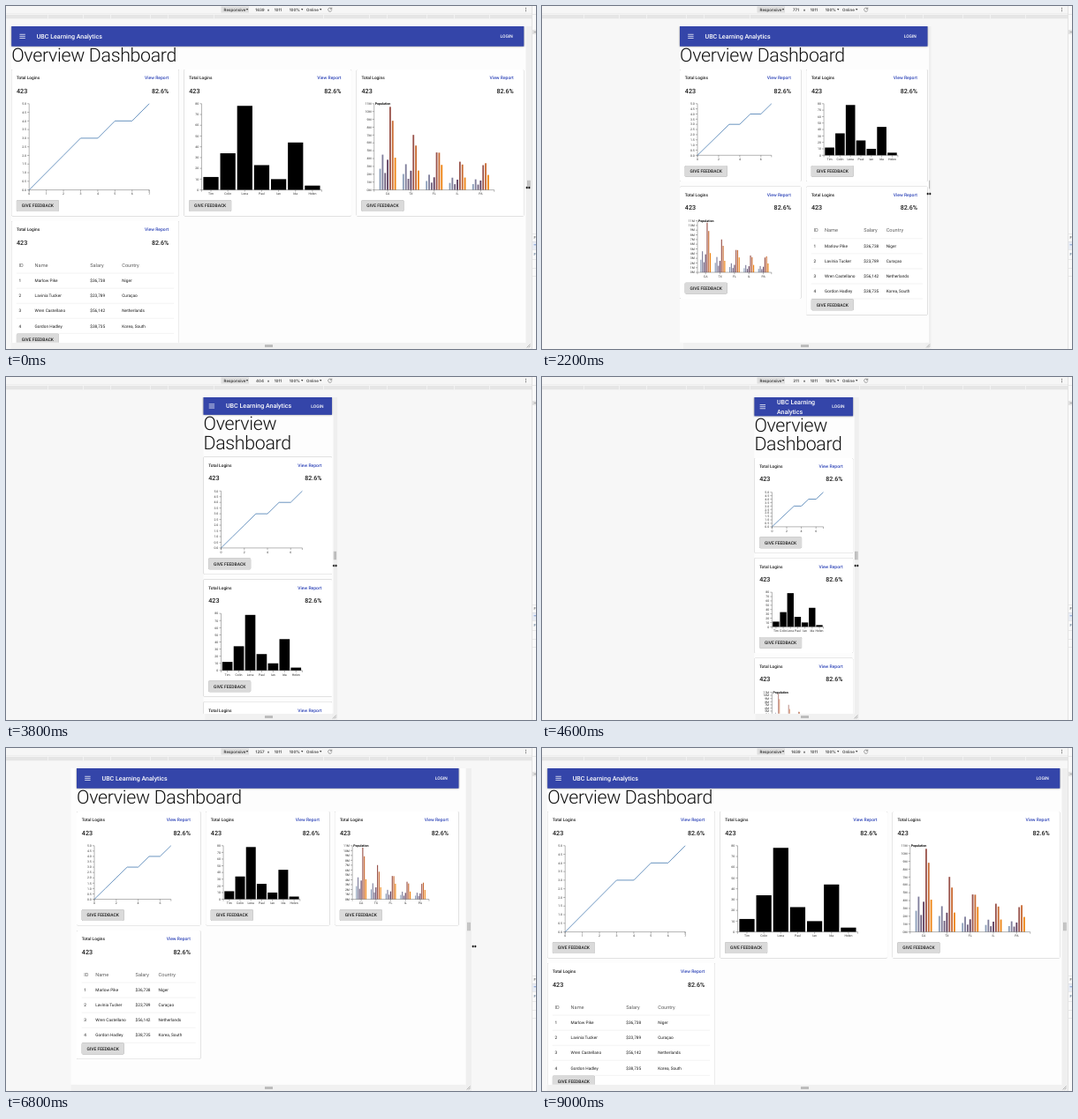
An HTML page for the animation above (9100 ms loop, 600 by 389 pixels).

```html
<!DOCTYPE html>
<html lang="en">
<head>
<meta charset="utf-8">
<title>Overview Dashboard</title>
<style>
html, body { margin: 0; width: 100%; height: 100%; overflow: hidden; background: #f7f7f7; }
svg { display: block; width: 600px; height: 389px; }
text { font-family: Roboto, "Liberation Sans", sans-serif; text-rendering: geometricPrecision; white-space: pre; }
.ui { font-family: Inter, Roboto, sans-serif; }
.card { filter: drop-shadow(.1px .8px .5px rgba(0,0,0,.45)); }
.bar { filter: drop-shadow(0 .9px .8px rgba(0,0,0,.45)); }
</style>
</head>
<body>
<svg id="stage" viewBox="0 0 600 389"></svg>
<script>
const K = 0.3556;            // device pixels to stage pixels
const LOOP = 9100, STEP = 100;
const PAD = 16 * K;
const INK = '#1c1c1c', BLUE = '#3445a9';

// time, frame left edge, content left edge, pointer x, pointer y
const MOVES = [
  [0, 5.6, 6.2, 591, 206],
  [1000, 61.4, 56.2, 528, 212],
  [2000, 143, 139, 454, 213],
  [2200, 160, 156, 438, 213],
  [3000, 189, 186, 403, 214],
  [3100, 198, 197.2, 398, 214],
  [4000, 233, 231, 365, 214],
  [4600, 241.7, 240.4, 356, 214],
  [5000, 238, 239, 364, 216],
  [6000, 168, 173, 450, 221],
  [6800, 73.5, 80, 530, 225],
  [7000, 66, 71, 540, 225],
  [8000, 13, 18, 590, 224],
  [8700, 5.6, 6.2, 606, 222],
  [LOOP, 5.6, 6.2, 606, 222]
];
const LINE = [0, 1, 2, 3, 3, 4, 4, 5];
const BARS = [['Tim', 12], ['Colin', 34], ['Lena', 78], ['Paul', 23], ['Ian', 10], ['Ida', 44], ['Helen', 4]];
const STATES = {
  CA: [2.7, 4.5, 2.16, 3.85, 10.6, 8.82, 4.11],
  TX: [2.03, 3.28, 1.42, 2.45, 7.02, 5.66, 2.47],
  FL: [1.14, 1.94, 0.93, 1.61, 4.78, 4.75, 3.19],
  IL: [0.89, 1.56, 0.73, 1.31, 3.6, 3.24, 1.58],
  PA: [0.74, 1.35, 0.68, 1.2, 3.16, 3.41, 1.91]
};
const TINTS = ['#8c9fba', '#7f7e9b', '#70607e', '#5f3f5f', '#9a544c', '#c96a32', '#ee8412'];
const ROWS = [
  ['ID', 'Name', 'Salary', 'Country'],
  ['1', 'Marlow Pike', '$36,738', 'Niger'],
  ['2', 'Lavinia Tucker', '$23,789', 'Curaçao'],
  ['3', 'Wren Castellano', '$56,142', 'Netherlands'],
  ['4', 'Gordon Hadley', '$38,735', 'Korea, South']
];

const n = v => +v.toFixed(2);
const range = (count, f) => Array.from({ length: count }, (_, i) => f(i)).join('');
const rect = (x, y, w, h, fill, more = '') =>
  `<rect x="${n(x)}" y="${n(y)}" width="${n(w)}" height="${n(h)}" fill="${fill}" ${more}/>`;
const path = (d, stroke, width, more = '') =>
  `<path d="${d}" fill="none" stroke="${stroke}" stroke-width="${width}" ${more}/>`;
// y is the vertical middle of the capitals
const text = (s, x, y, size, { fill = INK, weight = 400, anchor = 'start', cls = '', more = '' } = {}) =>
  `<text x="${n(x)}" y="${n(y + size * 0.355)}" font-size="${size}" font-weight="${weight}" fill="${fill}" text-anchor="${anchor}" class="${cls}" ${more}>${s}</text>`;

function pose(t) {
  let i = 1;
  while (MOVES[i][0] < t) i++;
  const a = MOVES[i - 1], b = MOVES[i];
  const u = (t - a[0]) / (b[0] - a[0]);
  return a.slice(1).map((v, k) => v + (b[k + 1] - v) * u);
}

function yAxis(x, y, h, labels) {
  const gap = h / (labels.length - 1);
  let d = `M${n(x)} ${n(y)}v${n(h)}`, out = '';
  labels.forEach((s, i) => {
    const ty = y + h - i * gap;
    d += `M${n(x - 2.1)} ${n(ty)}h2.1`;
    out += text(s, x - 3.2, ty, 3.5, { anchor: 'end', fill: '#333' });
  });
  return path(d, '#444', .4) + out;
}

function xAxis(x, y, w, marks) {
  let d = `M${n(x)} ${n(y + 2.1)}v-2.1h${n(w)}v2.1`, out = '';
  for (const [s, mx] of marks) {
    d += `M${n(mx)} ${n(y)}v2.1`;
    out += text(s, mx, y + 4.6, 3.5, { anchor: 'middle', fill: '#333' });
  }
  return path(d, '#444', .4) + out;
}

function lineChart(x, y, w, h) {
  const px = i => x + w * i / 7;
  const marks = LINE.map((_, i) => [i, px(i)]).filter(m => w > 120 || m[0] % 2 === 0);
  const d = 'M' + LINE.map((v, i) => `${n(px(i))} ${n(y + h - h * v / 5)}`).join('L');
  return yAxis(x, y, h, Array.from({ length: 11 }, (_, i) => (i / 2).toFixed(1))) +
    xAxis(x, y + h, w, marks) + path(d, '#4479b0', .8);
}

function barChart(x, y, w, h) {
  const step = w / 7.1, bw = step * .9;
  const left = i => x + step * (i + .1);
  return BARS.map(([, v], i) => rect(left(i), y + h - h * v / 80, bw, h * v / 80, '#000')).join('') +
    yAxis(x, y, h, Array.from({ length: 9 }, (_, i) => i * 10)) +
    xAxis(x, y + h, w, BARS.map(([s], i) => [s, left(i) + bw / 2]));
}

function groupChart(x, y, w, h) {
  const step = Math.floor(w / K / 5.1) * K;
  const thin = Math.floor(step * .9 / K / 7.4) * K, bw = thin * .64;
  const mid = i => x + w / 2 + (i - 2) * step;
  const bars = Object.values(STATES).map((set, i) => set.map((v, j) =>
    rect(mid(i) + (j - 3) * thin - bw / 2, y + h - h * v / 11, bw, h * v / 11, TINTS[j])).join('')).join('');
  return bars + yAxis(x, y, h, Array.from({ length: 12 }, (_, i) => i + 'M')) +
    xAxis(x, y + h, w, Object.keys(STATES).map((s, i) => [s, mid(i)])) +
    text('Population', x + 1, y + .2, 3.6, { weight: 700, fill: '#000' });
}

function table(x, y, w) {
  const extra = w - 138;
  const cols = [8.3, 21 + extra * .105, 65.5 + extra * .456, 91 + extra * .66];
  return ROWS.map((row, r) => {
    const cy = y + (r ? 50.5 + r * 17.07 : 49.5);
    return row.map((s, c) => text(s, x + cols[c], cy, r ? 4.75 : 5.6, { fill: r ? INK : '#5f5f5f' })).join('') +
      path(`M${n(x + PAD)} ${n(y + 59 + r * 17.07)}h${n(w - 2 * PAD)}`, '#e0e0e0', .4);
  }).join('');
}

const button = (x, y) =>
  rect(x, y, 48, 12.8, '#dadada', 'rx="1.4" class="card"') +
  text('GIVE FEEDBACK', x + 24, y + 6.5, 4.95, { weight: 500, anchor: 'middle' });

function card(x, y, w, h, body) {
  const right = x + w - 11.5, end = { weight: 500, anchor: 'end' };
  return rect(x, y, w, h, '#fff', 'rx="1.4" class="card"') +
    text('Total Logins', x + 5.8, y + 9.6, 4.8, { weight: 500 }) +
    text('View Report', right, y + 9.6, 5, { ...end, fill: '#3046b8' }) +
    text('423', x + 5.8, y + 24, 7.2, { weight: 500 }) +
    text('82.6%', right, y + 24, 7.1, end) +
    body + button(x + PAD, y + h - 18.2);
}

function content(x, w) {
  const wide = w / K >= 600, split = w < 130;
  const head = (wide ? 64 : split ? 60 : 56) * K;
  const edge = wide ? 0 : 3, cy = 23 + head / 2;
  const white = { fill: '#fff', weight: 500 };
  const title = (s, dy) => text(s, x + 28.5 - edge, cy + dy, 7.1, white);
  let out = rect(x, 23, w, head, BLUE, 'class="bar"') +
    path([-2.1, 0, 2.1].map(d => `M${n(x + 9.2 - edge)} ${n(cy + d)}h6.4`).join(''), '#fff', .75) +
    (split ? title('UBC Learning', -5.35) + title('Analytics', 5.35) : title('UBC Learning Analytics', 0)) +
    text('LOGIN', x + w - 12.6 + edge, cy, 4.95, { ...white, anchor: 'end' });

  const lines = w < 188 ? ['Overview', 'Dashboard'] : ['Overview Dashboard'];
  const size = 60 * K;
  lines.forEach((s, i) => {
    out += text(s, x, 23 + head + 9.7 + i * size, size, { weight: 300, fill: '#111', more: 'letter-spacing="-.3"' });
  });

  const cols = w / K >= 960 ? 3 : wide ? 2 : 1;
  const cw = (w - PAD * (cols - 1)) / cols;
  const chartW = cw - 53.6, chartH = chartW * .753 - 4.6;
  let y = 23 + head + size * lines.length + 4.9;
  [lineChart, barChart, groupChart, null].forEach((draw, i) => {
    const col = i % cols;
    if (i && !col) y += chartH + 68.6 + PAD;
    const cx = x + col * (cw + PAD);
    out += draw
      ? card(cx, y, cw, chartH + 68.6, draw(cx + 20, y + 38.8, chartW, chartH))
      : card(cx, y, cw, 145.8, table(cx, y, cw));
  });
  return out;
}

function toolbar(width) {
  const ui = (s, x, anchor = 'start') => text(s, x, 4, 4.5, { cls: 'ui', anchor, weight: 500, fill: '#2a2a2a' });
  const drop = x => `<path d="M${x} 3h2.4l-1.2 2z" fill="#444"/>`;
  const cuts = [47, 87, 118, 163, 183, 235];
  return rect(0, 0, 600, 8.3, '#f6f6f6') + rect(0, 8.3, 600, .4, '#dcdcdc') +
    rect(243.5, .5, 31.5, 7, '#dedede') + ui('Responsive', 246.6) + drop(271.8) +
    ui(width, 287.5, 'middle') + ui('×', 297, 'middle') + ui('1011', 308, 'middle') +
    ui('100%', 320.7) + drop(334) + ui('Online', 340) + drop(355) +
    path('M368.6 3.2A2.1 2.1 0 1 0 368.8 4.6M368.8 1.6v1.8h-1.8', '#666', .6) +
    [2.2, 4, 5.8].map(y => `<circle cx="588.5" cy="${y}" r=".55" fill="#555"/>`).join('') +
    rect(0, 9.8, 595, 4.6, '#e5e5e5') +
    cuts.map(c => rect(c, 9.8, .7, 4.6, '#f8f8f8') + rect(594 - c, 9.8, .7, 4.6, '#f8f8f8')).join('');
}

const sidePanel = () =>
  rect(595.5, 0, 4.5, 389, '#fafafa') + rect(595.3, 0, .5, 389, '#cfcfcf') +
  rect(596, 27, 4, 5, '#e2e2e2') + rect(597.6, 29, 2.4, .6, '#888') +
  rect(596, 267, 4, 9, '#e9edf5') +
  [9, 258, 267, 276, 287, 297, 306].map(y => rect(596, y, 4, .4, '#d0d0d0')).join('') +
  text('F', 597.4, 262.5, 4.2, { fill: '#444' }) + text('F', 597.4, 281.3, 4.2, { fill: '#357' }) +
  rect(597.6, 270.5, 2.4, .7, '#4a78c8');

function pointer(x, y, touch) {
  if (touch) return `<circle cx="${n(x)}" cy="${n(y)}" r="3.3" fill="#777" fill-opacity=".85" stroke="#555" stroke-width=".5"/>`;
  return `<path transform="translate(${n(x)} ${n(y)})" d="M-2.7 0l1.8-1.7v1.1h1.8v-1.1l1.8 1.7l-1.8 1.7v-1.1h-1.8v1.1z" fill="#111" stroke="#fff" stroke-width=".35" paint-order="stroke"/>`;
}

function scene(t) {
  const [left, x, px, py] = pose(t);
  const right = 594 - left, w = 592.5 - 2 * x;
  const grips = range(3, i => rect(right + 2 + i * 1.2, 198, .6, 9, '#a8a8a8'));
  return rect(0, 0, 600, 389, '#f7f7f7') + toolbar(Math.round((right - left) / K)) +
    rect(right, 23, 6.5, 366, '#efefef') + rect(left, 381.8, right - left, 7.2, '#f1f1f1') +
    rect(right + 1.6, 197.5, 3.8, 10, '#d9d9d9') + grips +
    range(3, i => rect(293, 384 + i * 1.2, 9, .6, '#999')) +
    path(`M${n(right + 1.2)} 387.4l4-4M${n(right + 3.2)} 387.4l2-2`, '#888', .6) +
    rect(left, 23, right - left, 358.8, '#fdfdfd') +
    rect(x, 23, w + 1.5, 358.8, '#fdfdfd') +
    `<clipPath id="view"><rect x="${n(x - 2)}" y="23" width="${n(w + 4)}" height="358.8"/></clipPath>` +
    `<g clip-path="url(#view)">${content(x, w)}</g>` + sidePanel() +
    (t < 8700 ? pointer(px, py, px < x + w - 3) : '');
}

const stage = document.getElementById('stage');
const start = performance.now();
let shown = -1;
function tick() {
  const t = Math.floor((performance.now() - start) % LOOP / STEP) * STEP;
  if (t !== shown) {
    stage.innerHTML = scene(t);
    shown = t;
  }
  requestAnimationFrame(tick);
}
tick();
</script>
</body>
</html>
```
